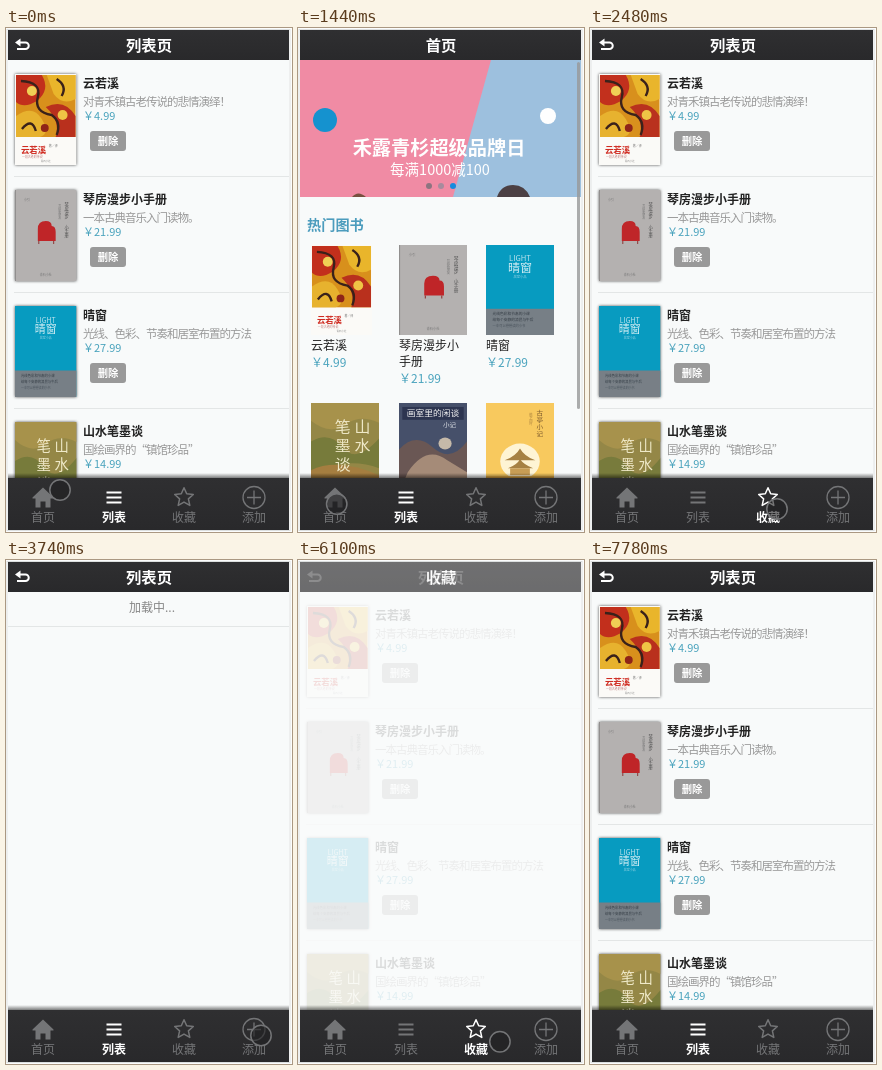
Write an HTML page that moves like this. It is 286 by 504 pixels and loops after 8290 ms.

```html
<!DOCTYPE html>
<html lang="zh-CN">
<head>
<meta charset="utf-8">
<title>书架</title>
<style>
html, body { margin: 0; width: 100%; height: 100%; overflow: hidden; background: #fcfdfd; }
svg { display: block; width: 286px; height: 504px; }
text { font-family: "Noto Sans CJK SC", "Noto Sans CJK", "Noto Sans", sans-serif; white-space: pre; }
.shade { filter: drop-shadow(0 0 1.5px rgba(0, 0, 0, .7)); }
.tab { color: #747577; }
.tab.on { color: #fff; }
.tab.on text { font-weight: 700; }
</style>
</head>
<body>
<svg id="stage" viewBox="0 0 286 504"></svg>
<script>
const LOOP = 8290, FADE = 300, LOAD = 510;
const BG = '#f8fafa', BLUE = '#4aa3bd';

// y is the optical middle of the line
const text = (x, y, size, fill, str, more = '') =>
  `<text x="${x}" y="${y + size * .37}" font-size="${size}" fill="${fill}" ${more}>${str}</text>`;
const mid = 'text-anchor="middle"', bold = 'font-weight="700"';
const rect = (x, y, w, h, fill, more = '') =>
  `<rect x="${x}" y="${y}" width="${w}" height="${h}" fill="${fill}" ${more}/>`;
const circle = (x, y, r, fill, more = '') =>
  `<circle cx="${x}" cy="${y}" r="${r}" fill="${fill}" ${more}/>`;
const path = (d, fill, more = '') => `<path d="${d}" fill="${fill}" ${more}/>`;
const column = (x, y, size, fill, str, step = size) =>
  [...str].map((c, i) => text(x, y + i * step, size, fill, c, mid)).join('');

// Covers are drawn in a 62 x 91 box
const covers = {
  opera: rect(0, 0, 62, 91, '#fbfaf7') + rect(1, 1, 60, 62, '#d8901c') +
    path('M1 1H27Q36 16 22 27Q9 35 1 28Z', '#c22f1c') +
    path('M32 1H61V25Q48 32 39 20Z', '#e9b52b') +
    path('M1 42Q18 30 27 45T25 63H1Z', '#e7b22e') +
    path('M31 33Q50 24 61 42V63H41Q46 47 31 33Z', '#b9301d') +
    path('M6 7Q27 8 23 23T37 41Q47 48 42 61M42 5Q53 12 47 22M7 55Q17 43 21 57', 'none', 'stroke="#3a211a" stroke-width="2.4"') +
    circle(17, 17, 5, '#f0cf55') + circle(48, 41, 5, '#efc545') + circle(30, 54, 4, '#8f2418') +
    text(6, 76, 8.5, '#cf2a20', '云若溪', bold) +
    text(34, 72, 3, '#777', '著／译') + text(7, 83, 3, '#b77', '一段古老的传说') +
    text(31, 87, 2.5, '#888', '青石小社', mid),
  music: rect(0, 0, 62, 91, '#b4b1b0') + rect(0, 0, 1, 91, '#918f8e') +
    path('M23 51V39Q23 31 31 31Q37 31 37 36Q41 36 41 42V51Z', '#bf2528') +
    path('M24 51V54M39 51V54', 'none', 'stroke="#8c3534"') +
    column(52, 14, 4.3, '#555', '琴房漫步') + column(52, 37, 4.3, '#555', '小手册') +
    column(45, 16, 3, '#777', '写给新朋友') +
    text(9, 10, 3, '#777', '小引') + text(31, 85, 3, '#777', '青石小社', mid),
  story: rect(0, 0, 62, 91, '#079bc0') + rect(0, 64.5, 62, 26.5, '#777f86') +
    text(31, 14, 7, '#bfe4ee', 'LIGHT', mid) + text(31, 23, 11, '#d7eff5', '晴窗', mid) +
    text(31, 32, 3, '#9bd5e4', '居室小品', mid) +
    text(6, 70, 3.4, '#343c44', '光线色彩和节奏的小课') +
    text(6, 76, 3.4, '#343c44', '给每个安静的清晨与午后') +
    text(6, 82, 3, '#4a535c', '一本可以慢慢读的小书'),
  paint: rect(0, 0, 62, 91, '#948746') +
    path('M0 0H62V20Q45 11 31 22T0 18Z', '#a7924b') +
    path('M0 39Q17 28 29 45T62 36V66Q35 54 0 70Z', '#777b3b') +
    path('M0 68Q24 55 62 73V91H0Z', '#a57e40') +
    column(47, 24, 14.5, '#efe9c8', '山水', 19) + column(29, 24, 14.5, '#efe9c8', '笔墨谈', 19),
  studio: rect(0, 0, 62, 91, '#46506a') + rect(3, 4, 56, 13, '#2d3550') +
    text(31, 10, 8, '#f4f4f4', '画室里的闲谈', mid) + text(46, 22, 6, '#e4e8ec', '小记', mid) +
    path('M0 47Q15 29 31 45T62 39V91H0Z', '#6a5754') +
    path('M8 70Q25 42 44 58L62 70V91H0Z', '#a58b78') + circle(42, 41, 6, '#c5b9a9'),
  tower: rect(0, 0, 62, 91, '#f8c95e') +
    column(49, 10, 6, '#735229', '古亭小记', 7) + column(41, 12, 3, '#a47c3c', '檐下四时') +
    circle(31, 59, 18, '#fff4d4') +
    path('M17 58Q27 54 31 46Q35 54 45 58ZM20 66Q28 63 31 57Q35 63 43 66Z', '#a68143') +
    rect(22, 66, 18, 7, '#c79d55') + rect(0, 74, 62, 17, '#e8ad43'),
};
const cover = (name, x, y, w, h) =>
  `<svg x="${x}" y="${y}" width="${w}" height="${h}" viewBox="0 0 62 91" preserveAspectRatio="none">${covers[name]}</svg>`;

const books = [
  ['opera', '云若溪', '对青禾镇古老传说的悲情演绎！', '4.99'],
  ['music', '琴房漫步小手册', '一本古典音乐入门读物。', '21.99'],
  ['story', '晴窗', '光线、色彩、节奏和居室布置的方法', '27.99'],
  ['paint', '山水笔墨谈', '国绘画界的“镇馆珍品”', '14.99'],
];

const header = title => rect(2, 2, 281, 30, 'url(#bar)') + text(143, 17, 15.3, '#fff', title, mid + ' ' + bold);
const backIcon = path('M13 14.5H19.5A3 3 0 0 1 19.5 21H11', 'none', 'stroke="#fff" stroke-width="2"') +
  path('M9 14.5L14.5 10.5V18.5Z', '#fff');
const rule = y => rect(8, y, 275, 1, '#e3e6e6');

const listRow = ([art, title, note, price], i) => {
  const y = i * 116;
  return `<g class="shade">${cover(art, 9, 46 + y, 61.5, 91)}</g>` +
    text(77, 55.5 + y, 12, '#222', title, bold) +
    text(77, 74 + y, 11.5, '#999', note, 'letter-spacing="-1"') +
    text(77, 88 + y, 11, BLUE, '￥' + price) +
    rect(84, 103 + y, 36, 20, '#999', 'rx="3"') +
    text(102, 113 + y, 10.3, '#fff', '删除', mid + ' ' + bold) + rule(148 + y);
};

const gridCell = (x, i) => {
  const [art, title, , price] = books[i];
  const lines = title.match(/.{1,5}/g);
  return cover(art, x, 217, i ? 68 : 61, 90) +
    lines.map((s, n) => text(x, 318 + n * 16, 12, '#222', s)).join('') +
    text(x, 318 + lines.length * 16.5, 12, BLUE, '￥' + price);
};

const banner = rect(2, 32, 281, 137, '#9dc0de') +
  path('M2 32H193L155 169H2Z', '#f08ba4') +
  circle(27, 92, 12, '#1592cf') + circle(250, 88, 8, '#fff') +
  path('M199 169Q203 157 215 157T232 169Z', '#4c4044') +
  path('M54 169Q60 162 68 169Z', '#77503f') +
  text(141, 120, 19.2, '#fff', '禾露青杉超级品牌日', mid + ' ' + bold) +
  text(142, 142, 14.5, '#fff', '每满1000减100', mid) +
  circle(131, 158, 3, '#8d7480') + circle(143, 158, 3, '#a78b9d') + circle(155, 158, 3, '#168bdd');

const pages = {
  list: rect(2, 2, 281, 500, BG) +
    `<g id="rows">${books.map(listRow).join('')}</g>` +
    `<g id="loading">${text(146, 48, 12, '#858585', '加载中...', mid)}${rect(2, 66, 281, 1, '#e3e6e6')}</g>` +
    header('列表页') + backIcon,
  home: rect(2, 2, 281, 500, BG) + banner +
    text(9, 197, 14.2, '#4c9cbd', '热门图书', bold) +
    [13, 101, 188].map(gridCell).join('') +
    cover('paint', 13, 375, 68, 90) + cover('studio', 101, 375, 68, 90) + cover('tower', 188, 375, 68, 90) +
    rect(279, 34, 3, 347, '#999', 'rx="1.5" opacity=".8"') + header('首页'),
  saved: rect(2, 2, 281, 500, BG) + header('收藏'),
};

const star = 'M' + Array.from({ length: 10 }, (_, i) => {
  const a = i * Math.PI / 5, r = i % 2 ? 4.6 : 9.8;
  return `${(r * Math.sin(a)).toFixed(1)} ${(-r * Math.cos(a)).toFixed(1)}`;
}).join('L') + 'Z';
const line = 'stroke="currentColor" stroke-linejoin="round" stroke-width=';
const tabs = [
  ['home', 37, '首页', path('M0 -10L10.5 0V1H7.5V10H2.5V4H-2.5V10H-7.5V1H-10.5V0Z', 'currentColor')],
  ['list', 108, '列表', path('M-7.5 -5H7.5M-7.5 0H7.5M-7.5 5H7.5', 'none', line + '"2"')],
  ['saved', 178, '收藏', path(star, 'none', line + '"1.5"')],
  ['add', 248, '添加', circle(0, 0, 11, 'none', line + '"1.3"') + path('M-7 0H7M0 -7V7', 'none', line + '"1.3"')],
];

const gradient = (id, stops) => `<linearGradient id="${id}" x2="0" y2="1">` +
  stops.map(([c, o], i) => `<stop offset="${i}" stop-color="${c}" stop-opacity="${o}"/>`).join('') + '</linearGradient>';

const group = name => `<g id="${name}">${pages[name]}</g>`;
document.getElementById('stage').innerHTML =
  `<defs>${gradient('bar', [['#2f2f31', 1], ['#29292b', 1]])}${gradient('fall', [['#000', 0], ['#000', .5]])}
  <clipPath id="app">${rect(2, 2, 281, 500, '#000')}</clipPath></defs>` +
  rect(1, 1.5, 283, 501, '#fff', 'stroke="#dcdfdf"') +
  `<g clip-path="url(#app)">${['list', 'home', 'saved'].map(group).join('')}
  ${rect(2, 445, 281, 5, 'url(#fall)')}${rect(2, 450, 281, 52, 'url(#bar)')}</g>` +
  tabs.map(([name, x, label, icon]) => `<g class="tab" id="tab-${name}">
    <g transform="translate(${x} 469.5)">${icon}</g>${text(x, 490, 12, 'currentColor', label, mid)}</g>`).join('') +
  `<g id="status">${path('M2 482H90Q93 482 93 485V502H2Z', '#d3d5d6', 'stroke="#aaa" stroke-width=".7"')}
  ${text(5, 492, 11.8, '#555', '正在等待 服务....')}</g>` +
  circle(0, 0, 10.2, '#202122', 'id="pointer" fill-opacity=".62" stroke="#747577" stroke-width="1.5"');

const $ = id => document.getElementById(id);
const visits = [[750, 'home'], [1440, 'list'], [2480, 'saved'], [3350, 'list'], [5940, 'saved'], [6650, 'list']];
const trips = [
  [[0, 54, 462], [120, 54, 462], [510, 39, 477], [690, 39, 477], [1440, 38, 476],
   [1670, 205, 488], [2250, 187, 481], [2650, 187, 481], [3090, 254, 474], [3150, 255, 475.5],
   [3860, 255, 475.5], [4100, 230, 493], [4160, 230, 493], [4940, 95, 464], [5000, 88, 464], [5210, 234, 482]],
  [[5390, 281, 487], [5750, 186, 484], [6000, 186, 484], [6400, 249, 475], [7160, 249, 475], [7780, 210, 514]],
];
const show = (id, on) => { $(id).style.display = on ? '' : 'none'; };

function pointerAt(t) {
  const trip = trips.find(k => t >= k[0][0] && t < k.at(-1)[0]);
  if (!trip) return null;
  const i = trip.findIndex(k => k[0] > t);
  const [t0, x0, y0] = trip[i - 1], [t1, x1, y1] = trip[i];
  const p = (t - t0) / (t1 - t0);
  return [x0 + (x1 - x0) * p, y0 + (y1 - y0) * p];
}

function draw(t) {
  const n = visits.findLastIndex(v => v[0] <= t);
  const [start, page] = visits[n] || [-LOOP, 'list'];
  const last = n > 0 ? visits[n - 1][1] : 'list';
  const p = Math.min(1, (t - start) / FADE);
  for (const name in pages) {
    const opacity = name === page ? p : name === last ? (1 - p) ** 1.5 : 0;
    $(name).setAttribute('opacity', opacity);
    show(name, opacity > 0);
  }
  const waiting = page === 'list' && t - start < LOAD;
  show('loading', waiting);
  show('rows', !waiting);
  for (const [name] of tabs) $('tab-' + name).classList.toggle('on', name === page);
  show('status', t >= 850 && t < 1200);
  const at = pointerAt(t);
  show('pointer', at);
  if (at) $('pointer').setAttribute('transform', `translate(${at})`);
}

const begin = performance.now();
function tick() {
  draw((performance.now() - begin) % LOOP);
  requestAnimationFrame(tick);
}
tick();
</script>
</body>
</html>
```
